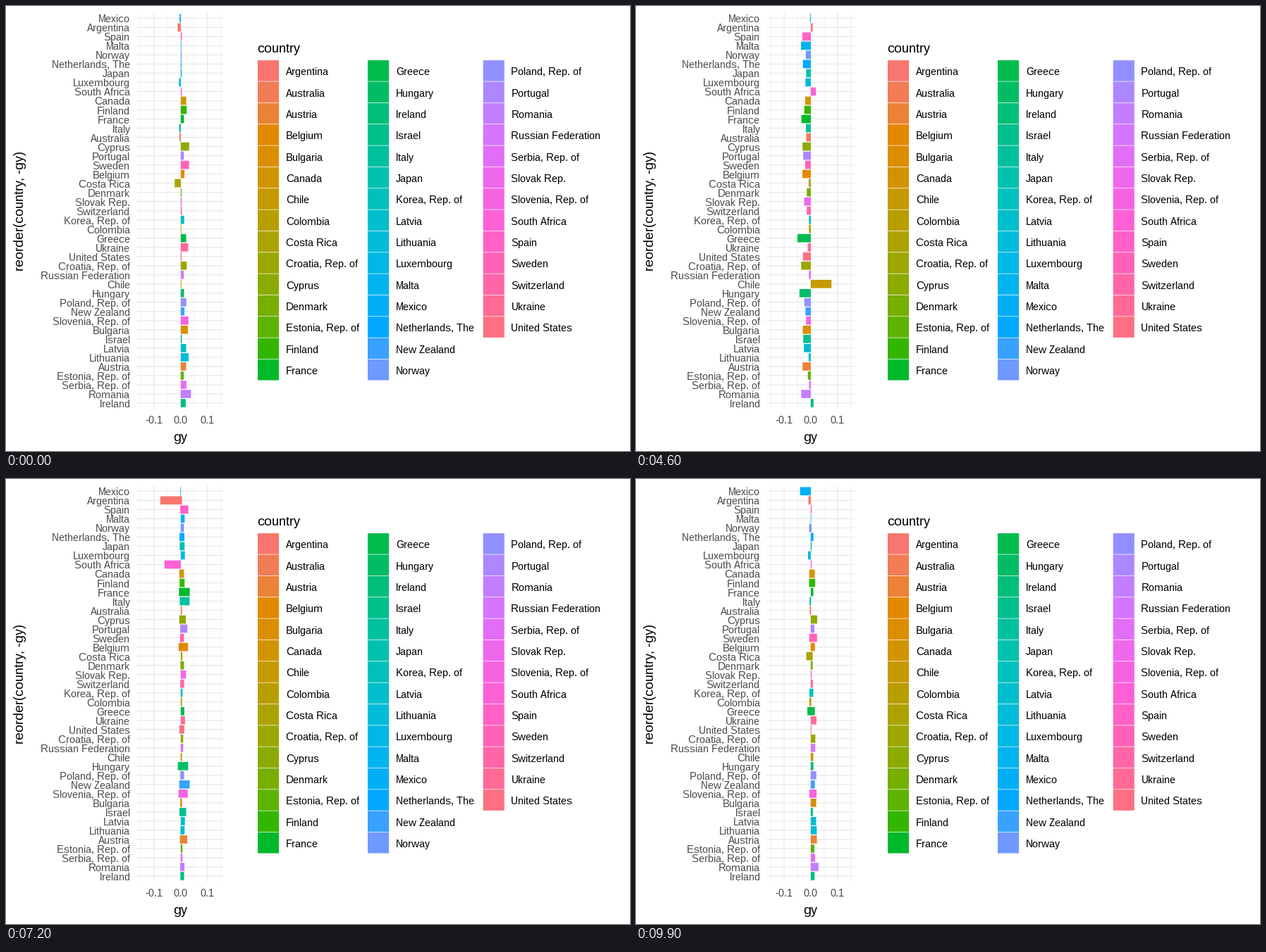
Write a matplotlib script that moves like this. It is 885x632 px and loops after 10 s.

```python
import numpy as np
import matplotlib
import matplotlib.pyplot as plt
from matplotlib.animation import FuncAnimation
from matplotlib.patches import Rectangle

matplotlib.rcParams.update({
    "font.family": "Liberation Sans",
    "text.hinting": "native",
    "text.hinting_factor": 1,
})
W, H, DPI = 885, 632, 100
FRAMES, INTERVAL = 100, 100
ZERO, PERCENT = 247.9, 3.785        # x of 0.0 and pixels per 0.01
TOP, ROW = 17.35, 13.015            # first row centre and row pitch
KEY = 30.34                         # legend key size

COUNTRIES = [
    "Mexico", "Argentina", "Spain", "Malta", "Norway", "Netherlands, The",
    "Japan", "Luxembourg", "South Africa", "Canada", "Finland", "France",
    "Italy", "Australia", "Cyprus", "Portugal", "Sweden", "Belgium",
    "Costa Rica", "Denmark", "Slovak Rep.", "Switzerland", "Korea, Rep. of",
    "Colombia", "Greece", "Ukraine", "United States", "Croatia, Rep. of",
    "Russian Federation", "Chile", "Hungary", "Poland, Rep. of",
    "New Zealand", "Slovenia, Rep. of", "Bulgaria", "Israel", "Latvia",
    "Lithuania", "Austria", "Estonia, Rep. of", "Serbia, Rep. of", "Romania",
    "Ireland",
]
N = len(COUNTRIES)
FIRST_WORDS = [name.split()[0].strip(",") for name in COUNTRIES]
rng = np.random.default_rng(4)


def hue_color(i, n, chroma=100, lum=65):
    """Evenly spaced hue in polar CIE-LUV, as sRGB."""
    h = np.radians(15 + 360 * i / n)
    u = chroma * np.cos(h) / (13 * lum) + 0.1978398
    v = chroma * np.sin(h) / (13 * lum) + 0.4683363
    y = ((lum + 16) / 116) ** 3
    x = 9 * y * u / (4 * v)
    z = -x / 3 - 5 * y + 3 * y / v
    rgb = np.array([3.240479 * x - 1.537150 * y - 0.498535 * z,
                    -0.969256 * x + 1.875992 * y + 0.041556 * z,
                    0.055648 * x - 0.204043 * y + 1.057311 * z])
    rgb = np.clip(rgb, 0, 1)
    return np.where(rgb > 0.00304, 1.055 * rgb ** (1 / 2.4) - 0.055, 12.92 * rgb)


def quarter(base, groups, spread=0.1):
    """Growth in percent: a common level, group levels, seeded scatter."""
    level = np.zeros(N) + base
    for value, members in groups.items():
        for word in members.split():
            level[FIRST_WORDS.index(word)] = value
    return level + rng.uniform(-1, 1, N) * (spread + 0.08 * abs(level))


calm = quarter(0.3, {
    3.6: "Romania",
    2.8: "Sweden Cyprus Ukraine Slovenia Bulgaria Lithuania",
    2.0: "Canada Finland Greece Croatia Poland Latvia Austria Serbia Ireland",
    1.2: "Portugal Belgium Russian Korea Hungary New Estonia France",
    -0.6: "Mexico Italy Luxembourg Australia",
    -1.2: "Argentina",
    -2.1: "Costa",
})
mixed = quarter(0.35, {
    1.8: "Costa Colombia Croatia Russian Ireland",
    1.2: "Malta Slovak Chile New Lithuania",
    -0.5: "Spain Norway Japan Italy",
    -1.0: "South Canada Sweden Korea Argentina Slovenia Austria Estonia",
    -2.6: "Finland Bulgaria Romania Mexico",
})
eve = quarter(0.1, {
    2.1: "Norway Sweden Slovenia Bulgaria Romania Serbia Poland",
    1.1: "Canada Finland Portugal Belgium Costa Korea Greece Croatia "
         "Hungary Israel Latvia Lithuania Ireland",
    -1.1: "Mexico France Italy New Russian",
    -3.0: "Argentina Japan",
    -6.9: "Chile",
})
slump = quarter(-7.8, {
    5.0: "South Chile",
    3.8: "Argentina",
    2.2: "Ireland",
    0.4: "Mexico",
    -1.1: "Costa",
    -4.4: "Norway Australia Denmark Korea Colombia Ukraine Russian "
          "Switzerland Estonia Lithuania Serbia",
    -11.6: "Malta France Cyprus Portugal Belgium Austria Romania",
    -13.9: "Spain Greece Croatia Hungary",
})
rebound = quarter(5.2, {
    14.2: "France",
    12.4: "Spain Italy New",
    10.4: "Portugal Belgium Hungary Slovenia Austria",
    7.7: "Cyprus Slovak Israel",
    1.7: "Argentina Australia Costa Korea Colombia Croatia Russian Chile "
         "Bulgaria Estonia Serbia",
    -0.8: "Mexico South",
})
growth = quarter(0.8, {
    12.3: "Romania Ireland",
    10.3: "Greece",
    6.6: "Croatia Slovenia Estonia Serbia",
    4.3: "Colombia Bulgaria",
    2.9: "Malta Luxembourg Italy Canada Korea Chile Hungary Latvia Lithuania",
    1.9: "Mexico Australia Cyprus Sweden United",
    -0.4: "Norway Finland France",
    -3.3: "Netherlands",
})
late = quarter(0.2, {
    3.0: "Netherlands Costa Russian Chile Austria",
    1.8: "Portugal Belgium Denmark Switzerland Poland New Israel Latvia Estonia",
    -2.3: "Norway Luxembourg Canada Finland Sweden Korea Colombia Slovenia",
    -4.9: "Greece",
    -15.3: "Mexico",
})
STATES = [
    calm,
    quarter(0.3 * calm + 0.4, {3.6: "Romania"}, 0.5),
    mixed,
    quarter(0.3 * calm + 0.3, {3.5: "Romania"}, 0.5),
    eve,
    quarter(0.3 * slump, {8.6: "Chile"}, 0.5),
    slump,
    rebound,
    quarter(0.3 - 0.1 * rebound, {-9.6: "Argentina", -7.8: "South"}, 0.6),
    growth,
    late,
]
STARTS = [5, 15, 25, 34, 43, 52, 61, 70, 79, 88, 97]
STEPS = [5, 5] + [4] * 9


def bar_ends(frame):
    """Left and right ends of all bars; both ends move linearly."""
    current, t = 0, 0.0
    for k, (start, steps) in enumerate(zip(STARTS, STEPS)):
        if frame >= start:
            current, t = k, min((frame - start + 1) / steps, 1)
    a, b = STATES[current], STATES[(current + 1) % len(STATES)]
    low = (1 - t) * np.minimum(a, 0) + t * np.minimum(b, 0)
    high = (1 - t) * np.maximum(a, 0) + t * np.maximum(b, 0)
    return ZERO + PERCENT * low, ZERO + PERCENT * high


LEGEND = sorted(COUNTRIES)
COLORS = {name: hue_color(i, N) for i, name in enumerate(LEGEND)}

fig = plt.figure(figsize=(W / DPI, H / DPI), dpi=DPI, facecolor="white")
ax = fig.add_axes([0, 0, 1, 1])
ax.set(xlim=(0, W), ylim=(H, 0))
ax.axis("off")


def label(x, y, text, px=15, color="black", **kw):
    ax.text(x, y, text, fontsize=px * 72 / DPI, color=color, va="baseline", **kw)


def grid(xs, ys, px):
    ax.plot(xs, ys, color="#EBEBEB", lw=px * 72 / DPI,
            solid_capstyle="butt", snap=False, zorder=1)


def box(x, y, w, h, color):
    return ax.add_patch(Rectangle((x, y), w, h, fc=color, lw=0, snap=False, zorder=2))


# Panel
LEFT, RIGHT = 185, 309.5
UPPER, LOWER = TOP - 0.6 * ROW, TOP + (N - 0.4) * ROW
for k in (-15, -5, 5, 15):
    grid([ZERO + k * PERCENT] * 2, [UPPER, LOWER], 0.7)
for k in (-10, 0, 10):
    grid([ZERO + k * PERCENT] * 2, [UPPER, LOWER], 1.4)
    label(ZERO + k * PERCENT, 593.3, f"{k / 100:.1f}", color="#4D4D4D", ha="center")

bars = []
for i, name in enumerate(COUNTRIES):
    y = TOP + i * ROW
    grid([LEFT, RIGHT], [y, y], 1.4)
    label(175.8, y + 6, name, color="#4D4D4D", ha="right")
    bars.append(box(ZERO, y - 0.45 * ROW, 0, 0.9 * ROW, COLORS[name]))

label(247, 618, "gy", px=19, ha="center")
label(25, 290.5, "reorder(country, -gy)", px=19, ha="center",
      rotation=90, rotation_mode="anchor")

# Legend
label(356.5, 66.3, "country", px=19)
for i, name in enumerate(LEGEND):
    column, row = divmod(i, 15)
    x, y = (357, 513, 676.7)[column], 77.1 + row * KEY
    box(x, y, 30.1, KEY - 0.7, COLORS[name])
    label(x + 39.8, y + KEY / 2 + 6.1, name)


def update(frame):
    for bar, x0, x1 in zip(bars, *bar_ends(frame)):
        bar.set_x(x0)
        bar.set_width(x1 - x0)
    return bars


anim = FuncAnimation(fig, update, frames=FRAMES, interval=INTERVAL,
                     repeat=True, repeat_delay=0, blit=False)
plt.show()
```
